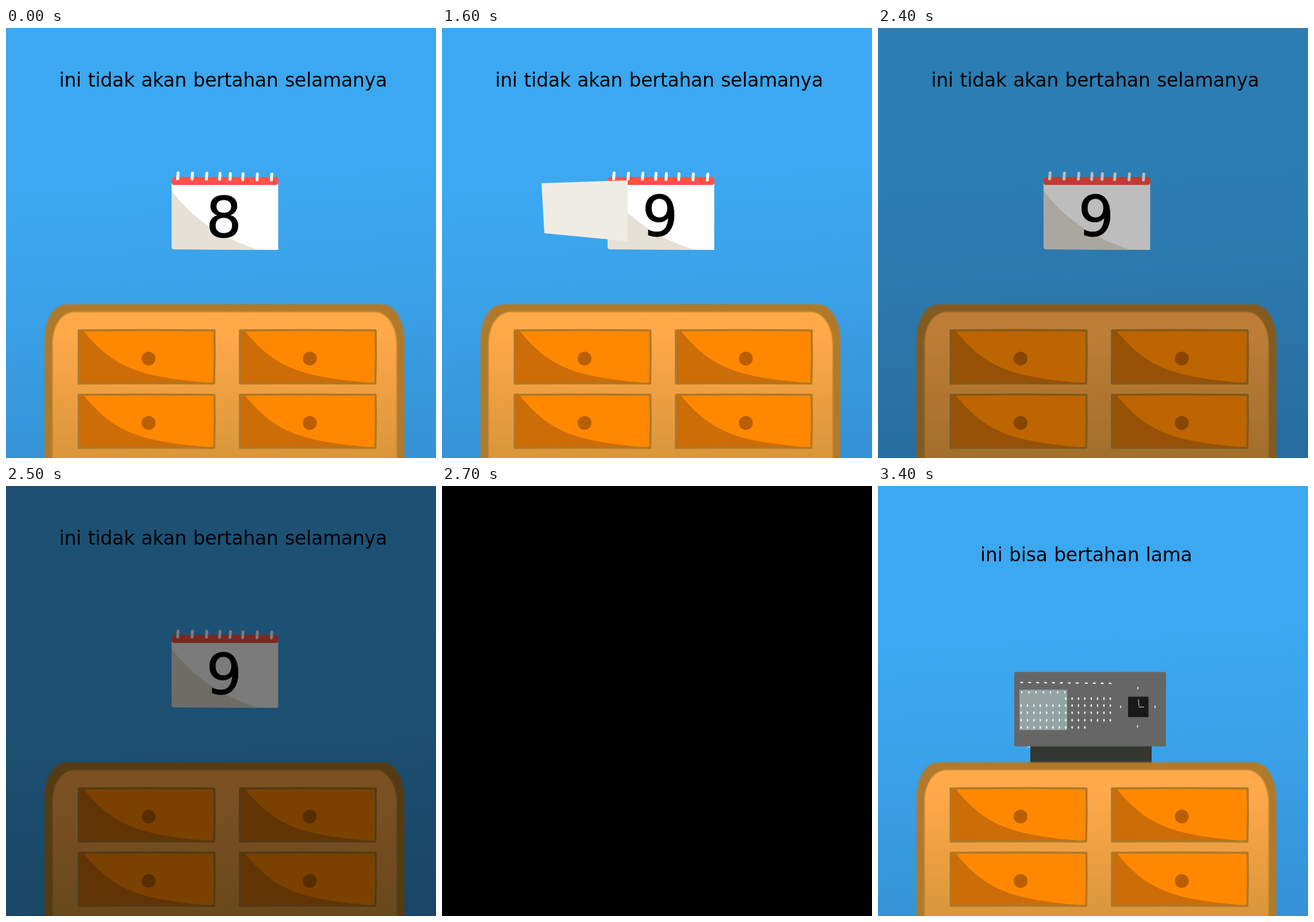
Animation of 748x748 px, one loop 4.5 s. Source, as an HTML page:

```html
<!DOCTYPE html>
<html lang="id">
<head>
<meta charset="utf-8">
<title>Kalender</title>
<style>
  html, body { margin: 0; width: 100%; height: 100%; overflow: hidden; background: #000; }
  svg { display: block; width: 100vw; height: 100vh; }
  text { font-family: "DejaVu Sans", Verdana, sans-serif; }
  .title { font-size: 32.85px; word-spacing: 1.1px; letter-spacing: -0.13px; }
  .digit { font-size: 98px; text-anchor: middle; stroke: #000; stroke-width: 1; }
</style>
</head>
<body>
<svg viewBox="0 0 748 748">
  <defs>
    <linearGradient id="sky" gradientUnits="userSpaceOnUse" x1="365" y1="260" x2="395" y2="750">
      <stop offset="0" stop-color="#3ba8f1"/>
      <stop offset=".4" stop-color="#3aa2e9"/>
      <stop offset="1" stop-color="#3592d5"/>
    </linearGradient>
    <linearGradient id="wood" gradientUnits="userSpaceOnUse" x1="0" y1="530" x2="0" y2="748">
      <stop offset="0" stop-color="#ffa94a"/>
      <stop offset="1" stop-color="#da963a"/>
    </linearGradient>
    <filter id="soft"><feGaussianBlur stdDeviation="1"/></filter>
    <filter id="fine"><feGaussianBlur stdDeviation=".5"/></filter>
    <clipPath id="front"><polygon id="frontShape"/></clipPath>
    <g id="drawer">
      <path d="M126.500 526 L244 524.800 L362.500 526 L363 572 L362 618.500 L245 619 L126.500 618 Z" fill="#ff8800"/>
      <path d="M135 527 C188 592 233 606 345 616.500 L362 619 H126 V526 Z" fill="#cc6d08"/>
      <path d="M126.500 526 L244 525.500 L362.500 526 L363 572 L362 618.500 L245 618 L126.500 618.500 Z"
            fill="none" stroke="#ad782a" stroke-width="3.600" stroke-linejoin="round" filter="url(#fine)"/>
      <circle cx="248" cy="575" r="12" fill="#b95e02"/>
    </g>
  </defs>

  <rect width="748" height="748" fill="url(#sky)"/>

  <g id="calendarScene">
    <text class="title" x="92.400" y="102">ini tidak akan bertahan selamanya</text>
    <path d="M288 270 H473.500 V386 L293 385 Q288 385 288 380 Z" fill="#fff"/>
    <path d="M288 283 C320 325 365 362 438 385.500 L293 385 Q288 385 288 380 Z" fill="#e5e1d7"/>
    <path d="M292 259 H470 Q474 260 474 266 Q474 273 470 273 H292 Q288 273 288 267 Q288 261 292 259 Z" fill="#ff5247"/>
    <g id="rings" stroke="#fff" stroke-width="5" stroke-linecap="round"></g>
    <text class="digit" id="nine" x="379.500" y="361.500">9</text>
    <g clip-path="url(#front)"><text class="digit" id="eight" x="379" y="363.500">8</text></g>
    <polygon id="flap" fill="#efece4"/>
    <g id="sheet">
      <rect x="-60" y="-36" width="120" height="72" rx="2" fill="#fff"/>
      <path d="M-60 -29 Q-25 20 36 36 H-60 Z" fill="#e5e1d7"/>
    </g>
  </g>

  <g id="clockScene">
    <text class="title" x="178" y="131">ini bisa bertahan lama</text>
    <path d="M252 452 L266 452 V456 Z" fill="#a9cfd4"/>
    <rect x="265" y="449" width="211" height="36" fill="#343632"/>
    <rect x="237" y="323.500" width="264" height="129.500" rx="3" fill="#666" filter="url(#fine)"/>
    <rect x="246" y="354.500" width="83" height="70" fill="#94a3a4"/>
    <g id="marks" fill="#fff"></g>
    <rect x="435" y="366.500" width="35.500" height="35.500" rx="1" fill="#1b1818"/>
    <path d="M453 371 L454 383 M454 384.500 H463" stroke="#e4e4e4" stroke-width="1" fill="none"/>
  </g>

  <path d="M67 760 V546 C67 506 82 481 107 480.500 H653 C677 481 693 508 693 546 V760 Z" fill="#b07a2a" filter="url(#soft)"/>
  <path d="M81 760 V550 C81 514 99 494 120 494 H642 C662 494 679.500 518 679.500 550 V760 Z" fill="url(#wood)" filter="url(#soft)"/>
  <use href="#drawer"/>
  <use href="#drawer" x="280.500"/>
  <use href="#drawer" y="112"/>
  <use href="#drawer" x="280.500" y="112"/>

  <rect id="shade" width="748" height="748"/>
</svg>
<script>
const LOOP = 4500, STEP = 100;
const $ = id => document.getElementById(id);

function add(parent, tag, attrs) {
  const el = document.createElementNS("http://www.w3.org/2000/svg", tag);
  for (const key in attrs) el.setAttribute(key, attrs[key]);
  parent.appendChild(el);
}

const show = (id, on) => $(id).setAttribute("display", on ? "inline" : "none");
const setPoints = (id, pts) => $(id).setAttribute("points", pts.map(p => p.join()).join(" "));

[299, 324, 349, 372, 390, 412, 437, 462].forEach((x, i) => {
  const y = 252 + i * 0.28;
  add($("rings"), "line", { x1: x + 0.4, y1: y, x2: x - 0.4, y2: y + 10.5 });
});

const mark = (cx, cy, rx = 1.2, ry = 2.4) => add($("marks"), "ellipse", { cx, cy, rx, ry });
for (let i = 0; i < 12; i++) mark(250 + i * 13.8 + (i > 7 ? 2 : 0), 341.7 + i * 0.15, 2.7, 1.2);
for (let i = 0; i < 7; i++) mark(250 + i * 12.5, 359, 1.2, 2);
[[370, 7, 14], [382, 0, 14], [394.5, 0, 14], [407.5, 0, 14], [420, 0, 10]].forEach(([y, from, to]) => {
  for (let i = from; i <= to; i++) mark(249 + i * 11.08, y);
});
[[452, 351.5], [482, 384], [451.5, 418], [422, 384]].forEach(([x, y]) => mark(x, y, 0.9, 2.6));

const PAGE = [[288, 273], [473, 273], [473, 385], [288, 385]];

// Folds the page so that its lower right corner lands on (x, y).
function foldCorner(x, y) {
  const [cx, cy] = PAGE[2];
  const nx = x - cx, ny = y - cy, len2 = nx * nx + ny * ny;
  const side = ([px, py]) => ((px - (x + cx) / 2) * nx + (py - (y + cy) / 2) * ny) / len2;
  const front = [], flap = [];
  PAGE.forEach((a, i) => {
    const b = PAGE[(i + 1) % 4], da = side(a), db = side(b);
    if (da >= 0) front.push(a);
    else flap.push([a[0] - 2 * da * nx, a[1] - 2 * da * ny]);
    if (da * db < 0) {
      const k = da / (da - db);
      const cut = [a[0] + (b[0] - a[0]) * k, a[1] + (b[1] - a[1]) * k];
      front.push(cut);
      flap.push(cut);
    }
  });
  setPoints("frontShape", front);
  setPoints("flap", flap);
}

// Pulls the page over to the left, k from 0 to 1.
function peel(k) {
  const fold = 473 - 150 * k, edge = 2 * fold - 473;
  setPoints("frontShape", [[288, 258], [fold, 258], [fold, 385], [288, 385]]);
  setPoints("flap", [[fold, 265], [edge, 258 + 12 * k], [edge + 5 * k, 371 - 14 * k], [fold, 371]]);
}

function fly(k) {
  const x = 230 - 210 * k, y = 135 + 1570 * (k - 0.25) ** 2;
  $("sheet").setAttribute("transform", `translate(${x} ${y}) rotate(${-15 - 110 * k})`);
}

function darkness(t) {
  if (t < 2300) return 0;
  if (t < 2700) return Math.min(1, (t - 2300) / 385);
  if (t < 3400) return Math.pow((3400 - t) / 700, 2.87);
  return 0;
}

function draw(time) {
  const t = Math.floor((time % LOOP) / STEP) * STEP;
  const flutter = t > 0 && t < 600;
  const tearing = t > 1000 && t <= 1600;
  const flying = t > 1600 && t < 2200;

  show("calendarScene", t < 2700);
  show("clockScene", t >= 2700);
  show("eight", t <= 1600);
  show("nine", flutter || t > 1000);
  show("flap", flutter || tearing);
  show("sheet", flying);

  if (flutter) {
    const k = Math.sin(Math.PI * t / 600);
    foldCorner(473 - 108 * k, 385 - 127 * k);
  } else if (tearing) peel((t - 1000) / 600);
  else setPoints("frontShape", PAGE);
  if (flying) fly((t - 1600) / 600);

  $("shade").setAttribute("opacity", darkness(t));
}

const start = performance.now();
function tick() {
  draw(performance.now() - start);
  requestAnimationFrame(tick);
}
tick();
</script>
</body>
</html>
```
